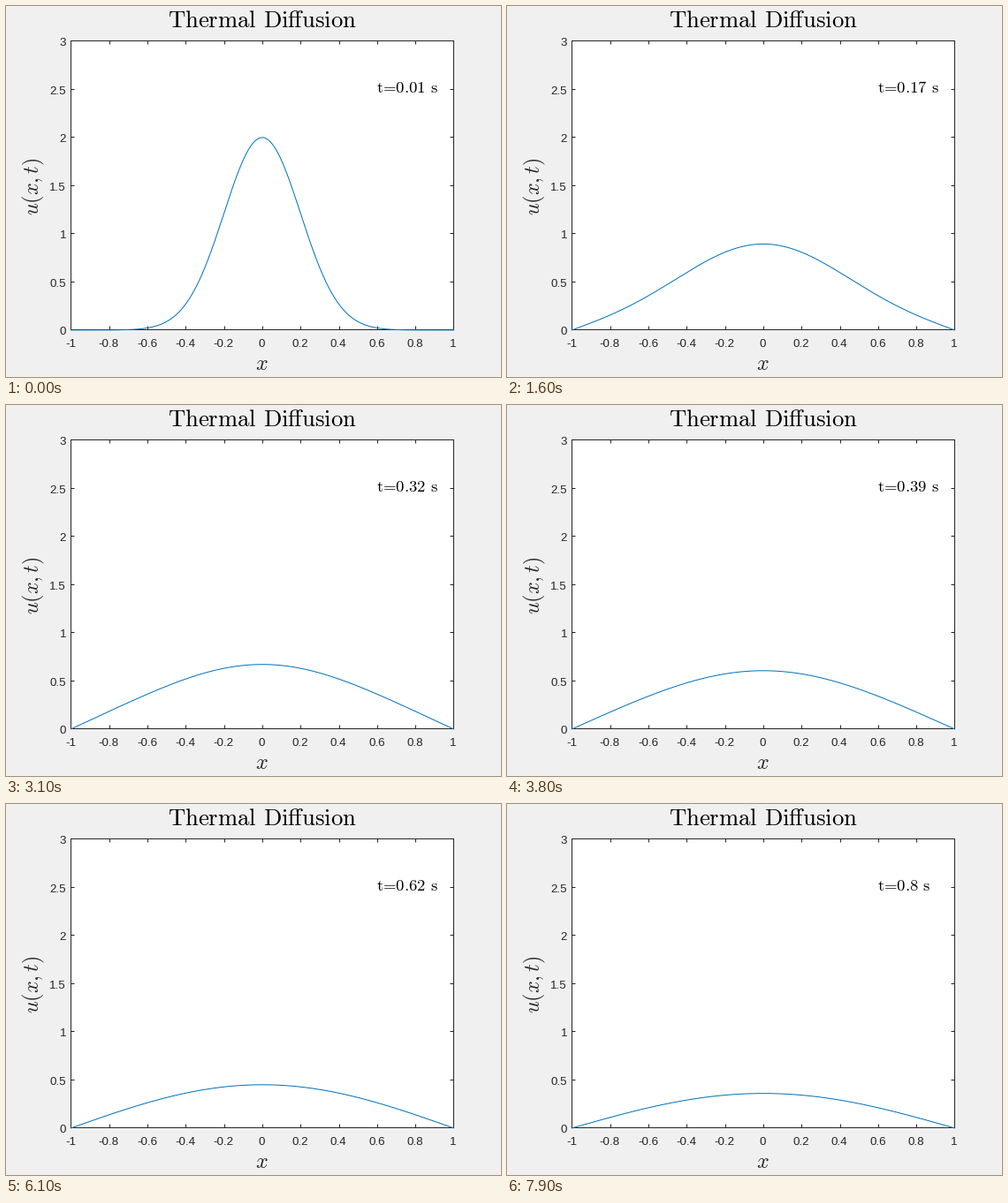
A matplotlib script that plays this animation: 560x420 px, repeating every 8000 ms.

```python
import numpy as np
import matplotlib.pyplot as plt
from matplotlib.animation import FuncAnimation
from matplotlib.transforms import Affine2D

W, H, DPI = 560, 420, 80
PX = 72 / DPI                        # points per pixel
# Just under half a pixel, so the box snaps to columns 73, 506 and rows 39, 366
LEFT, RIGHT, TOP, BOTTOM = 73.4, 506.4, 39.4, 366.4
MID = 289.5
INK = "#262626"
FRAMES, DT = 80, 0.01
AMP, VAR, DIFF = 2.0, 0.04, 0.5      # initial Gaussian and diffusivity

plt.rcParams["mathtext.fontset"] = "cm"
plt.rcParams["font.family"] = "Liberation Sans"

fig = plt.figure(figsize=(W / DPI, H / DPI), dpi=DPI, facecolor="#f0f0f0")
ax = fig.add_axes([LEFT / W, 1 - BOTTOM / H, (RIGHT - LEFT) / W, (BOTTOM - TOP) / H])
ax.set(xlim=(-1, 1), ylim=(0, 3), facecolor="white")


def label(x, y, text, size, ha="center", color=INK, **kw):
    """Put text with its baseline at pixel (x, y), measured from the top left."""
    return fig.text(x / W, 1 - y / H, text, fontsize=size * PX, ha=ha,
                    va="baseline", color=color, **kw)


# Box, ticks and tick labels
xticks = np.linspace(-1, 1, 11)
yticks = np.linspace(0, 3, 7)
ax.set_xticks(xticks, [""] * len(xticks))
ax.set_yticks(yticks, [""] * len(yticks))
ax.tick_params(direction="in", length=4.3 * PX, width=PX, color=INK, top=True, right=True)
for spine in ax.spines.values():
    spine.set(linewidth=PX, color=INK)

for v in xticks:
    label(MID + v / 2 * (RIGHT - LEFT), 386, f"{round(v, 1) + 0:g}", 13.33)
for v in yticks:
    label(68, BOTTOM - v / 3 * (BOTTOM - TOP) + 6, f"{v:g}", 13.33, ha="right")

# \xae is the ff ligature in the Computer Modern encoding
label(MID, 24, "$\\mathrm{Thermal}\\hspace{0.38}\\mathrm{Di\xaeusion}$", 26.67, color="black")
label(MID - 0.5, 412, "$x$", 24)
label(37, 204, "$u(x,t)$", 24, rotation=90, rotation_mode="anchor")
clock = label(419, 98, "", 18.67, ha="left", color="black")

# Sine-series solution of the heat equation with u(-1) = u(1) = 0
x = np.linspace(-1, 1, 401)
k = (np.arange(24) + 0.5) * np.pi
coef = AMP * np.sqrt(2 * np.pi * VAR) * np.exp(-VAR * k**2 / 2)
modes = np.cos(np.outer(x, k))
curve, = ax.plot([], [], color="#0072bd", lw=PX, zorder=3, clip_on=False,
                 transform=ax.transData + Affine2D().translate(0, -0.5))


def update(i):
    curve.set_data(x, modes @ (coef * np.exp(-DIFF * k**2 * i * DT)))
    t = f"{(i + 1) * DT:g}"
    clock.set_text(rf"$\mathrm{{t}}\hspace{{-0.2}}=\hspace{{-0.2}}\mathrm{{{t}}}"
                   r"\hspace{0.38}\mathrm{s}$")
    return curve, clock


anim = FuncAnimation(fig, update, frames=FRAMES, interval=100, repeat=True, repeat_delay=0)
plt.show()
```
